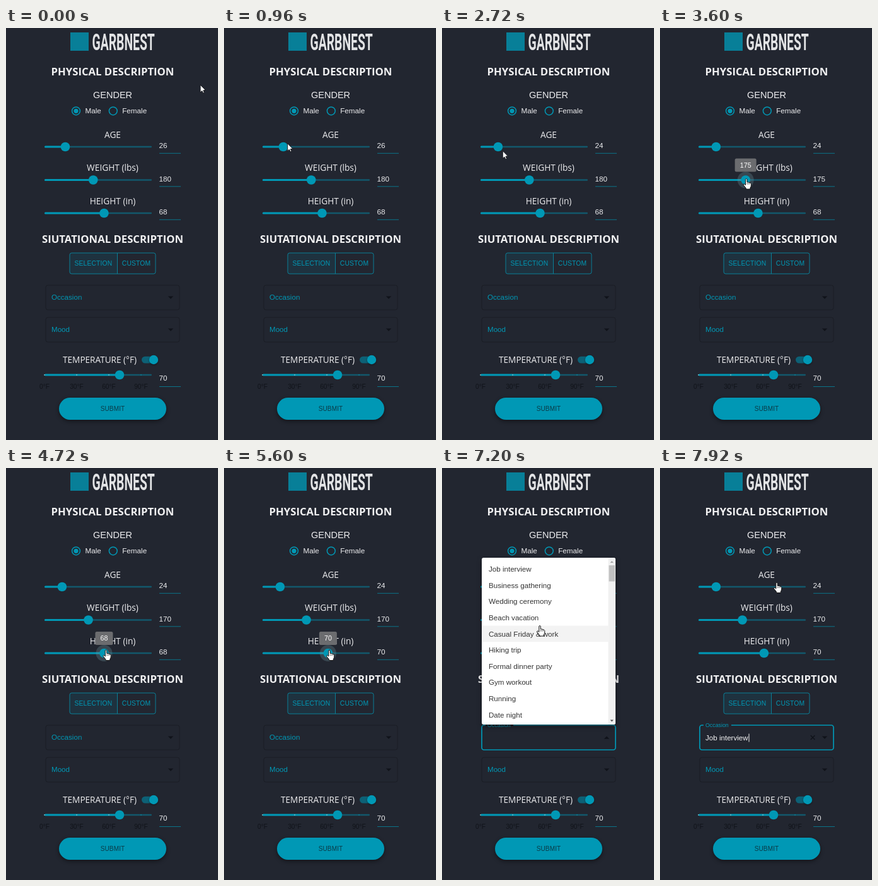
Recreate the animation shown at these times as an HTML page with a canvas. Size 336 by 652 pixels, loop 8000 ms.

```html
<!DOCTYPE html>
<html lang="en">
<head>
<meta charset="utf-8">
<title>Outfit form</title>
<style>
html, body { margin: 0; width: 100%; height: 100%; overflow: hidden; background: #222630; }
canvas { display: block; width: 336px; height: 652px; }
</style>
</head>
<body>
<canvas id="stage"></canvas>
<script>
const W = 336, H = 652, LOOP = 8000;
const BG = '#222630', TEAL = '#0098b5', DIM = '#12586c', LIGHT = '#ececee';
const SANS = '"Liberation Sans", Arial, sans-serif';
const HUMAN = '"Open Sans", "Noto Sans", sans-serif';
const OPEN = 6640, PICK = 7760, THUMB_LAG = 80;

const canvas = document.getElementById('stage');
const ctx = canvas.getContext('2d');
const ratio = window.devicePixelRatio || 1;
canvas.width = W * ratio;
canvas.height = H * ratio;

// Cursor: time, x, y of the hot spot
const path = [
  [0, 308, 90], [320, 308, 90], [1040, 93.5, 186], [2080, 93.5, 186], [2400, 88, 186],
  [2640, 88, 186], [2960, 139.5, 239], [3360, 139.5, 239], [3600, 136.7, 239], [3840, 131, 239],
  [4160, 131, 239], [4480, 158.5, 288.5], [5040, 158.5, 288.5], [5360, 167, 288.5], [5840, 167, 288.5],
  [6320, 203, 434], [6640, 203, 434], [7200, 155, 250], [7400, 155, 250], [7600, 182, 160],
  [7760, 182, 160], [7920, 185, 181.5]
];
const sliders = [
  { label: 'AGE', y: 188, min: 13, max: 80, keys: [[2080, 26], [2400, 24]], active: [1040, 2640] },
  { label: 'WEIGHT (lbs)', y: 240.5, min: 80, max: 300, keys: [[3360, 180], [3600, 175], [3840, 170]], active: [2960, 4200] },
  { label: 'HEIGHT (in)', y: 293, min: 48, max: 84, keys: [[5040, 68], [5360, 70]], active: [4480, 5880] }
];
const items = ['Job interview', 'Business gathering', 'Wedding ceremony', 'Beach vacation',
  'Casual Friday & work', 'Hiking trip', 'Formal dinner party', 'Gym workout', 'Running', 'Date night'];

const smooth = k => k * k * (3 - 2 * k);
const within = (t, [a, b]) => t >= a && t < b;

// Interpolates every column of a keyframe list
function sample(keys, t, ease = k => k) {
  if (t <= keys[0][0]) return keys[0].slice(1);
  for (let i = 1; i < keys.length; i++) {
    const a = keys[i - 1], b = keys[i];
    if (t < b[0]) {
      const k = ease((t - a[0]) / (b[0] - a[0]));
      return a.slice(1).map((v, n) => v + (b[n + 1] - v) * k);
    }
  }
  return keys[keys.length - 1].slice(1);
}

function text(s, x, y, size, { color = LIGHT, font = SANS, align = 'left', weight = 400, spacing = 0 } = {}) {
  ctx.font = `${weight} ${size}px ${font}`;
  ctx.letterSpacing = spacing + 'px';
  ctx.fillStyle = color;
  ctx.textAlign = align;
  ctx.fillText(s, x, y);
}

function rect(x, y, w, h, color) {
  ctx.fillStyle = color;
  ctx.fillRect(x, y, w, h);
}

function round(x, y, w, h, r, fill, stroke, line = 1) {
  ctx.beginPath();
  ctx.roundRect(x, y, w, h, r);
  if (fill) { ctx.fillStyle = fill; ctx.fill(); }
  if (stroke) { ctx.strokeStyle = stroke; ctx.lineWidth = line; ctx.stroke(); }
}

function disc(x, y, r, color) {
  ctx.beginPath();
  ctx.arc(x, y, r, 0, Math.PI * 2);
  ctx.fillStyle = color;
  ctx.fill();
}

function ring(x, y, r, color, line) {
  ctx.beginPath();
  ctx.arc(x, y, r, 0, Math.PI * 2);
  ctx.strokeStyle = color;
  ctx.lineWidth = line;
  ctx.stroke();
}

function triangle(x, y, w, h, color) {
  ctx.beginPath();
  ctx.moveTo(x - w, y - h / 2);
  ctx.lineTo(x + w, y - h / 2);
  ctx.lineTo(x, y + h / 2);
  ctx.fillStyle = color;
  ctx.fill();
}

function shadow(color, blur, dy) {
  ctx.shadowColor = color;
  ctx.shadowBlur = blur * ratio;
  ctx.shadowOffsetY = dy * ratio;
}

const noShadow = () => shadow('transparent', 0, 0);

function header() {
  rect(102, 7, 29, 29, '#087f98');
  ctx.save();
  ctx.translate(136.5, 35);
  ctx.scale(0.53, 1);
  text('GARBNEST', 0, 0, 36.5, { font: 'Roboto, sans-serif', weight: 700, color: '#e2e3e5' });
  ctx.restore();
}

function heading(s, y) {
  text(s, 169, y, 16.7, { font: HUMAN, weight: 700, align: 'center', color: '#f0f0f1' });
}

function radio(x, label, on) {
  ring(x, 131.3, 6.4, TEAL, 1.5);
  if (on) disc(x, 131.3, 3.6, TEAL);
  text(label, x + 14.4, 135, 11.7);
}

function track(x, y) {
  round(61, y - 1.2, 170, 2.4, 1.2, DIM);
  round(61, y - 1.5, x - 61, 3, 1.5, TEAL);
}

function number(v, y) {
  text(v, 242.5, y + 2.3, 11.7);
  rect(243, y + 9.8, 34, 1, '#0b7389');
}

function slider(s, t) {
  const v = Math.round(sample(s.keys, t)[0]);
  const x = 61 + 170 * (sample(s.keys, t - THUMB_LAG)[0] - s.min) / (s.max - s.min);
  text(s.label, 169, s.y - 14.5, 13.7, { font: HUMAN, align: 'center' });
  track(x, s.y);
  number(v, s.y);
  if (within(t, s.active)) {
    disc(x, s.y, 13, 'rgba(110,150,160,.3)');
    const w = String(v).length * 6 + 16;
    round(x - w / 2, s.y - 34, w, 21, 2.5, '#6b6c6f');
    text(v, x, s.y - 20, 10.7, { align: 'center', color: '#fff' });
  }
  disc(x, s.y, 7.3, TEAL);
}

function toggle() {
  round(101, 356, 75.5, 33, [3, 0, 0, 3], '#1e323f');
  round(101, 356, 136, 33, 3, null, '#0a7f97');
  rect(176, 356, 1, 33, '#0a7f97');
  const style = { color: TEAL, align: 'center', spacing: 0.15 };
  text('SELECTION', 138.4, 376, 10.3, style);
  text('CUSTOM', 206.5, 376, 10.3, style);
}

function field(y, edge, line) {
  round(63, y, 212, 39, 3.5, null, edge, line);
}

function occasion(t) {
  const open = t >= OPEN, picked = t >= PICK;
  const hover = t >= 6200;
  field(407, open ? TEAL : hover ? '#10131a' : '#1a1d25', open ? 1.7 : hover ? 1.3 : 1);
  if (!open) {
    text('Occasion', 72, 430, 11.6, { color: TEAL });
  } else {
    rect(69, 405, 44, 4, BG);
    text('Occasion', 72, 409.5, 8.8, { color: TEAL });
    if (picked) text('Job interview', 72, 430.5, 11.6, { color: '#f4f4f4' });
    const since = t - (picked ? PICK : OPEN);
    if (since % 1060 < 530) rect(picked ? 140.5 : 72, 420.5, 1, 13, '#f4f4f4');
  }
  if (picked) {
    ctx.beginPath();
    ctx.moveTo(238.8, 423.2); ctx.lineTo(245.4, 429.8);
    ctx.moveTo(245.4, 423.2); ctx.lineTo(238.8, 429.8);
    ctx.strokeStyle = '#10131a';
    ctx.lineWidth = 1.4;
    ctx.stroke();
  }
  const up = open && !picked;
  triangle(261, 426.7, 4.2, up ? -4.2 : 4.2, '#10131a');
}

function temperature() {
  text('TEMPERATURE (°F)', 148.5, 530, 13.6, { font: HUMAN, align: 'center' });
  round(215, 519.7, 24, 10.8, 5.4, '#0d6176');
  shadow('rgba(0,0,0,.4)', 3, 1);
  disc(234, 525, 7.2, TEAL);
  noShadow();
  track(180, 549);
  for (let i = 0; i < 4; i++) {
    const x = 61 + i * 51;
    rect(x - 0.7, 548, 1.5, 2, i < 3 ? '#6fb9c8' : '#0d7a91');
    text(i * 30 + '°F', x, 571, 10.2, { color: '#11141a', align: 'center' });
  }
  disc(180, 549, 7.3, TEAL);
  text(70, 242.5, 558, 11.7);
  rect(243, 567, 34, 1, '#0b7389');
}

function submit() {
  shadow('rgba(0,0,0,.45)', 6, 2.5);
  round(84, 585, 170, 35, 17.5, TEAL);
  noShadow();
  text('SUBMIT', 169, 606.2, 10, { color: '#0a3a47', align: 'center', spacing: 0.15 });
}

function popup(cursorY) {
  const top = 147.2, step = 25.6;
  shadow('rgba(0,0,0,.5)', 7, 3);
  round(63, 142, 212, 264, 3, '#fff');
  noShadow();
  const over = Math.floor((cursorY - top) / step);
  items.forEach((s, i) => {
    const y = top + i * step;
    if (i === over) rect(63, y, 200.5, step, '#f3f3f3');
    text(s, 74, y + 17, 11.6, { color: '#343434' });
  });
  round(263.5, 142, 11.5, 264, [0, 3, 3, 0], '#f1f1f1');
  rect(264.5, 154, 9.5, 25.5, '#c1c1c1');
  triangle(269.2, 148.5, 2.6, -3, '#a3a3a3');
  triangle(269.2, 400, 2.6, 3, '#505050');
}

function outline(points, fill, edge) {
  ctx.beginPath();
  points.forEach(([x, y]) => ctx.lineTo(x, y));
  ctx.closePath();
  ctx.lineJoin = 'round';
  ctx.lineWidth = 1;
  ctx.fillStyle = fill;
  ctx.strokeStyle = edge;
  ctx.fill();
  ctx.stroke();
}

function hand() {
  outline([[-1.2, 0.3], [0, -0.5], [1.2, 0.3], [1.3, 5], [3.4, 5], [5.2, 5.7], [7, 6.4], [7.8, 7.6],
    [7.6, 11.5], [6.3, 14], [6.2, 16], [-0.2, 16], [-0.6, 14.2], [-4.6, 9.2], [-4, 8], [-2.8, 8], [-1.2, 9.6]],
    '#fff', '#111');
  ctx.beginPath();
  for (const x of [1.3, 3.3, 5.3]) {
    ctx.moveTo(x, 6.2);
    ctx.lineTo(x, 8.6);
  }
  ctx.lineWidth = 0.6;
  ctx.stroke();
}

function arrow() {
  outline([[0, 0], [0, 12], [2.7, 9.5], [4.6, 13.2], [6.4, 12.3], [4.7, 8.8], [8.2, 8.4]], '#fff', '#15171c');
}

function beam() {
  rect(-0.5, -5, 1, 11, '#c9cacd');
  for (const y of [-5.5, 5.5]) {
    rect(-3, y, 2.4, 1, '#c9cacd');
    rect(0.6, y, 2.4, 1, '#c9cacd');
  }
}

function pointer(t, x, y) {
  const listed = t >= OPEN && t < PICK;
  const onSlider = sliders.some(s => within(t, s.active));
  const inField = x > 63 && x < 275 && y > 407 && y < 446;
  ctx.save();
  ctx.translate(x, y);
  if (onSlider || (listed && y < 406) || t >= PICK) hand();
  else if (inField) beam();
  else arrow();
  ctx.restore();
}

function draw(t) {
  ctx.setTransform(ratio, 0, 0, ratio, 0, 0);
  ctx.textBaseline = 'alphabetic';
  rect(0, 0, W, H, BG);
  const [x, y] = sample(path, t, smooth);

  header();
  heading('PHYSICAL DESCRIPTION', 75);
  text('GENDER', 169, 111, 14.5, { align: 'center' });
  radio(111, 'Male', true);
  radio(169.8, 'Female', false);
  sliders.forEach(s => slider(s, t));
  heading('SIUTATIONAL DESCRIPTION', 339.5);
  toggle();
  occasion(t);
  field(458, '#1a1d25', 1);
  text('Mood', 72, 481.3, 11.6, { color: TEAL });
  triangle(261, 477.7, 4.2, 4.2, '#10131a');
  temperature();
  submit();
  if (t >= OPEN && t < PICK) popup(y);
  pointer(t, x, y);
}

const start = performance.now();
function tick() {
  draw((performance.now() - start) % LOOP);
  requestAnimationFrame(tick);
}
tick();
</script>
</body>
</html>
```
